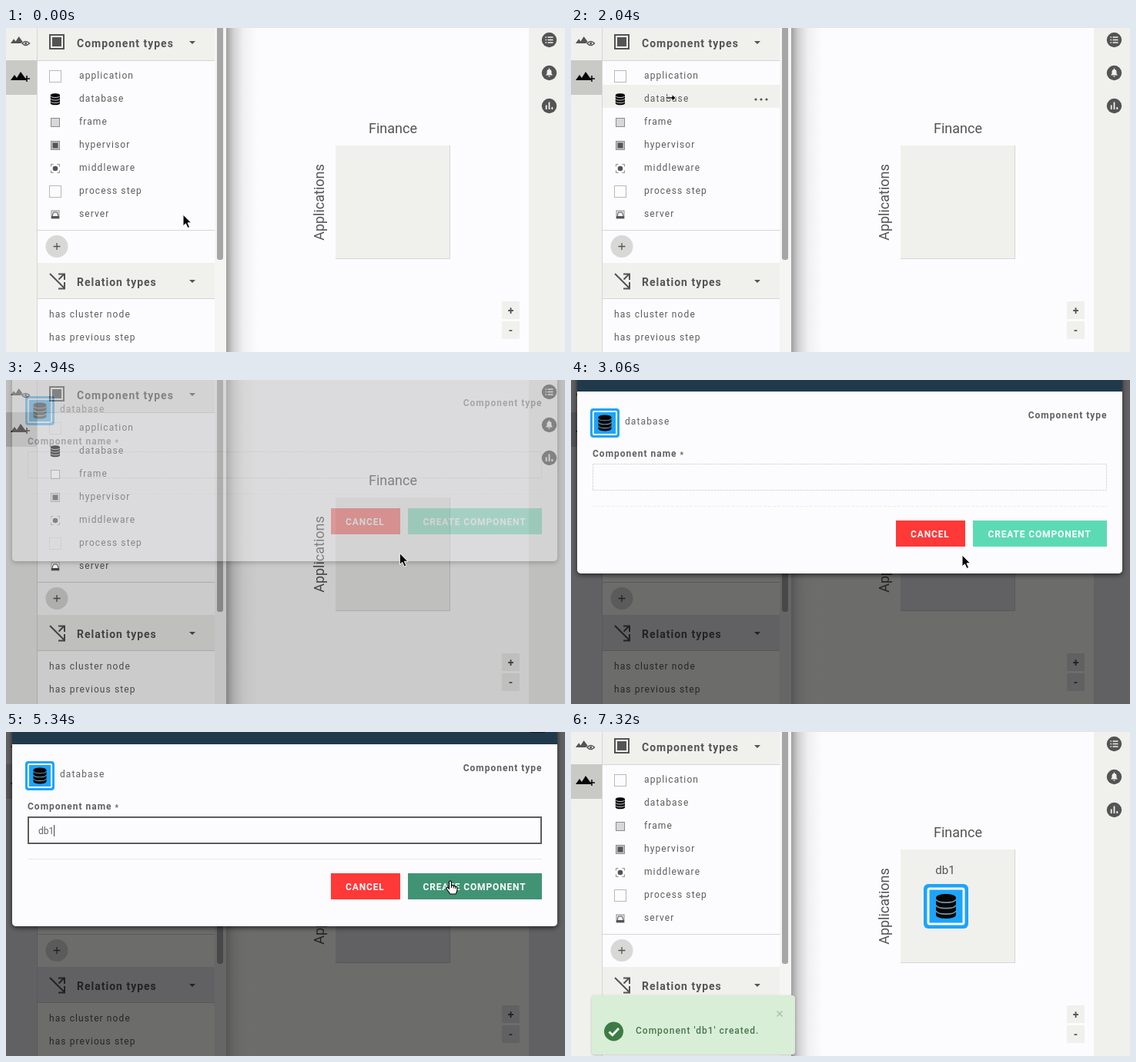
An HTML page for the animation above (7350 ms loop, 726 px wide and 422 px high).

```html
<!DOCTYPE html>
<html lang="en">
<head>
<meta charset="utf-8">
<title>Create a component</title>
<style>
  html, body { margin: 0; width: 100%; height: 100%; overflow: hidden; background: #fcfcfe; }
  svg { display: block; width: 726px; height: 422px; font: 400 12px Roboto, sans-serif; }
  text { fill: var(--text); letter-spacing: 1.1px; white-space: pre; }
  .head { font-size: 14px; letter-spacing: 1px; fill: var(--ink); }
  .label { font-size: 18px; letter-spacing: 0; text-anchor: middle; fill: var(--ink); }
  .medium { font-weight: 500; letter-spacing: 1px; }
  .bold { font-weight: 700; letter-spacing: 1px; }
  .paper { fill: var(--paper); }
  .pale { fill: var(--pale); }
  .tile { fill: var(--tile); }
  .ink { fill: var(--ink); }
  .dark { fill: var(--dark); }
  .line { fill: none; stroke: var(--ink); stroke-width: 2; }
  .thin { fill: none; stroke: var(--ink); stroke-width: 1; }
  .rule { fill: none; stroke: var(--rule); }
  #modal text { fill: #606062; }
  #modal .button { fill: #fcfcfe; letter-spacing: .85px; font-weight: 700; }
</style>
</head>
<body>
<svg id="stage" viewBox="0 0 726 422"></svg>
<script>
const LOOP = 7350;
const rect = (x, y, w, h, attrs = '') => `<rect x="${x}" y="${y}" width="${w}" height="${h}" ${attrs}/>`;
const circle = (x, y, r, attrs = '') => `<circle cx="${x}" cy="${y}" r="${r}" ${attrs}/>`;
const path = (d, attrs = '') => `<path d="${d}" ${attrs}/>`;
const text = (x, y, s, attrs = '') => `<text x="${x}" y="${y}" ${attrs}>${s}</text>`;
const at = (x, y, body, scale = 1) => `<g transform="translate(${x} ${y}) scale(${scale})">${body}</g>`;

// Stack of three discs in a 26 x 32 box
const cylinder = (gap, attrs) =>
  path('M0 5C0-1.6 26-1.6 26 5V27C26 33.6 0 33.6 0 27Z', attrs) +
  [7, 14.5, 22].map(y => path(`M0 ${y}C2 ${y + 5.5} 24 ${y + 5.5} 26 ${y}`, `fill="none" stroke="${gap}" stroke-width="1.7"`)).join('');

const databaseTile =
  rect(0, 0, 58, 58, 'rx="6" fill="#1ca4fa"') +
  rect(6, 6, 46, 46, 'rx="2" fill="#1ca4fa" stroke="#fcfcfe" stroke-width="3"') +
  at(16, 13, cylinder('#6c98b0', 'fill="#060606"'));

const mountains = path('M0 11L5 4L8 8L13 0L21 11Z');
const emptyBox = rect(.5, .5, 15, 15, 'fill="none" stroke="#b8b8b8"');

const rowIcons = {
  application: emptyBox,
  database: at(1.8, .3, cylinder('var(--paper)', 'class="dark"'), .47),
  frame: rect(2.5, 2.5, 11, 11, 'fill="#d8d8d8" stroke="#8c8c8c"'),
  hypervisor: rect(2.5, 2.5, 11, 11, 'fill="#c4c4c4" stroke="#8c8c8c"') + rect(4.5, 4.5, 7, 7, 'class="ink"'),
  middleware: path('M2.5 5.5V2.5H5.5M10.5 2.5H13.5V5.5M13.5 10.5V13.5H10.5M5.5 13.5H2.5V10.5', 'fill="none" stroke="#8c8c8c"') +
    circle(8, 8, 3.3, 'class="ink"'),
  'process step': emptyBox,
  server: rect(3, 3, 10, 10, 'fill="#f0f0f0" stroke="#8c8c8c"') + rect(3, 10, 10, 3, 'class="ink"') + path('M4 10L5.5 5H10.5L12 10', 'class="thin"')
};
const names = Object.keys(rowIcons);

const navigation =
  rect(0, 0, 40, 422, 'class="pale"') + rect(0, 42, 40, 45, 'class="tile"') +
  at(6, 11, `<g class="ink">${mountains}</g>`, .82) +
  path('M19 20Q25.5 13 32 20Q25.5 27 19 20Z', 'class="pale"') +
  path('M21 20Q25.5 15 30.5 20Q25.5 25 21 20Z', 'class="line" style="stroke-width:1.5"') + circle(25.7, 20, 1.5, 'class="ink"') +
  at(6, 57, `<g class="dark">${mountains}</g>`) +
  path('M23 66H31M27 62V70', 'stroke="var(--dark)" stroke-width="1.5"') +
  path('M40.5 0V422', 'class="rule"');

const sectionHead = (y, label) => text(92, y + 25, label, 'class="head bold"') + path(`M238 ${y + 17}h8l-4 4z`, 'class="ink"');

const sidebar =
  rect(41, 0, 245, 422, 'class="paper"') + rect(271, 0, 15, 422, 'class="pale" opacity=".55"') +
  rect(41, 0, 230, 43, 'class="pale"') + path('M41 42.5H271', 'class="rule"') +
  sectionHead(0, 'Component types') +
  rect(57, 9, 18, 18, 'class="line"') + rect(60, 12, 12, 12, 'class="ink"') +
  `<g id="hover">${rect(41, 0, 230, 30, 'class="pale"')}${[240, 247, 254].map(x => circle(x, 19, 1.6, 'class="ink"')).join('')}</g>` +
  names.map((n, i) => at(56, 55 + i * 30, rowIcons[n]) + text(95, 66 + i * 30, n)).join('') +
  path('M41 263.5H271', 'class="rule"') +
  circle(66, 284.5, 14.5, 'class="tile" opacity=".7"') + path('M61.5 284.5H70.5M66 280V289', 'class="line" style="stroke-width:1.3"') +
  rect(41, 306, 230, 47, 'class="pale"') + path('M41 352.5H271', 'class="rule"') +
  sectionHead(311, 'Relation types') +
  path('M57 320L76 339M68 339.5H76V331M68 320.5H76V328M76 320L68.5 327.5', 'class="line"') +
  text(56, 377, 'has cluster node') + text(56, 407, 'has previous step') +
  rect(274, -4, 8, 306, 'rx="3" fill="var(--thumb)"');

const tool = (y, glyph) => circle(705.5, y, 9.7, 'class="ink"') + at(705.5, y, glyph);
const bell = path('M-4.5 3L-3 1V-2Q-3-4.3-.6-4.6V-6H.6V-4.6Q3-4.3 3-2V1L4.5 3ZM-1.5 4H1.5L0 5.5Z', 'class="pale"');
const zoom = (y, sign) => rect(644, y, 23, 23, 'class="pale"') + text(656, y + 17, sign, 'class="head bold" text-anchor="middle"');

const canvas =
  rect(285, 0, 394, 422, 'class="paper"') + rect(285, 0, 42, 422, 'fill="url(#edge)"') +
  rect(428, 153, 149, 148, 'class="pale"') + path('M428 300.5H576.5V153', 'class="rule"') +
  text(502.5, 137, 'Finance', 'class="label"') +
  text(0, 0, 'Applications', 'class="label" transform="translate(412.5 227) rotate(-90)"') +
  `<g id="component">${at(458, 198, databaseTile)}${text(486, 185, 'db1', 'class="label" style="font-size:15px"')}</g>` +
  zoom(356, '+') + zoom(382, '-') +
  rect(679, 0, 47, 422, 'class="pale"') +
  tool(15.5, path('M-5-3.5H-3.5M-2-3.5H5M-5 0H-3.5M-2 0H5M-5 3.5H-3.5M-2 3.5H5', 'stroke="var(--pale)" stroke-width="1.6"')) +
  tool(58.5, bell) +
  tool(101.5, path('M-3.8 4.5V-1M0 4.5V-5M3.8 4.5V1.5', 'stroke="var(--pale)" stroke-width="1.8"'));

const modal = `<g id="modal">` +
  rect(8, -20, 708, 273, 'rx="5" fill="#fcfcfe" filter="url(#shadow)"') +
  rect(8, -20, 708, 36, 'fill="#203a4c"') + rect(681, -4, 19, 5, 'fill="#0c141c"') +
  at(25, 38, databaseTile, .655) + text(70, 59, 'database') +
  text(696.5, 51, 'Component type', 'class="bold" text-anchor="end"') +
  text(28, 101, 'Component name <tspan font-size="10" dy="1">*</tspan>', 'class="bold"') +
  '<rect id="field" fill="#fcfcfe"/>' + '<path id="divider" d="M28 165.5H696" fill="none"/>' +
  '<text id="typed" x="42" y="133" style="letter-spacing:0"></text>' + '<path id="caret" stroke="#404040"/>' +
  rect(422, 184, 90, 34, 'fill="#ff3838"') + text(441, 206, 'CANCEL', 'class="button"') +
  rect(522, 184, 174, 34, 'id="create"') + text(541.5, 206, 'CREATE COMPONENT', 'class="button"') + '</g>';

const toast = `<g id="toast">` + rect(27, 343, 264, 77, 'rx="4" fill="#d8eed6" filter="url(#soft)"') +
  circle(55.5, 390, 12.5, 'fill="#3c7c44"') + path('M49.5 390.5L53.8 394.7L62 386', 'fill="none" stroke="#f4fcf4" stroke-width="3"') +
  text(84, 393, "Component 'db1' created.", 'class="medium" style="fill:#4c7450"') +
  path('M267.5 363.5L274.5 370.5M274.5 363.5L267.5 370.5', 'stroke="#a8c4a8" stroke-width="1.5"') + '</g>';

const outline = 'fill="#080808" stroke="#fcfcfe" stroke-width="1"';
const pointers = {
  arrow: path('M0 0V15L3.4 11.8L6 17.5L8.6 16.3L6 10.8H10.6Z', outline),
  drag: path('M-6-1.2H2V-4.5L7 0L2 4.5V1.2H-6Z', outline),
  beam: path('M-3-7Q0-7 0-5Q0-7 3-7M0-5V5M-3 7Q0 7 0 5Q0 7 3 7', 'fill="none" stroke="#202020" stroke-width="1.2"'),
  hand: path('M-1.5 1Q0-1 1.5 1V6Q3 5 4.2 6.5Q6 6 6.7 7.5Q9 7 9 9.5V12Q8.5 15 7 17H0Q-3 13-5.5 9.5Q-4.5 7-1.5 10Z', 'fill="#fcfcfe" stroke="#080808" stroke-width="1.2"') +
    path('M1.5 6V9M4.2 7V9.5M6.7 8V10', 'stroke="#080808"')
};

const stage = document.getElementById('stage');
stage.innerHTML = `<defs>
  <linearGradient id="edge"><stop offset="0" stop-color="#3c3c3c" stop-opacity=".52"/><stop offset=".25" stop-color="#505050" stop-opacity=".25"/>
  <stop offset=".55" stop-color="#606060" stop-opacity=".08"/><stop offset="1" stop-color="#808080" stop-opacity="0"/></linearGradient>
  <filter id="shadow" x="-5%" y="-5%" width="110%" height="115%"><feDropShadow dx="0" dy="2" stdDeviation="3" flood-color="#000" flood-opacity=".65"/></filter>
  <filter id="soft"><feDropShadow dx="0" dy="1" stdDeviation="1.5" flood-color="#404040" flood-opacity=".3"/></filter></defs>` +
  rect(0, 0, 726, 422, 'class="paper"') + canvas + sidebar + navigation + toast + modal +
  `<g id="pointer">${Object.entries(pointers).map(([k, v]) => `<g data-kind="${k}">${v}</g>`).join('')}</g>`;

const el = Object.fromEntries([...stage.querySelectorAll('[id]')].map(n => [n.id, n]));
const kinds = [...el.pointer.children];

// Each colour in plain view and behind the dialog
const palette = {
  paper: [[252, 252, 254], [108, 108, 107]],
  pale: [[240, 240, 237], [97, 97, 99]],
  tile: [[201, 201, 198], [84, 84, 86]],
  ink: [[84, 84, 84], [34, 34, 34]],
  text: [[92, 92, 92], [38, 38, 38]],
  dark: [[6, 6, 6], [6, 6, 6]],
  rule: [[214, 214, 212], [88, 88, 90]],
  thumb: [[166, 166, 166], [72, 72, 72]]
};

const track = [
  [0, 230, 243], [300, 230, 243], [1300, 129, 91], [2080, 129, 91], [2780, 512, 225], [2900, 512, 225],
  [3060, 508, 228], [3200, 508, 228], [3560, 300, 128], [4960, 300, 128], [5300, 577, 194],
  [5500, 577, 194], [5700, 576, 196], [6100, 576, 196], [6700, 590, 430], [LOOP, 590, 430]
];

const mix = (a, b, k) => a + (b - a) * k;
const ramp = (t, a, b) => Math.min(1, Math.max(0, (t - a) / (b - a)));
const ease = k => k * k * (3 - 2 * k);
const show = (node, on) => node.setAttribute('visibility', on ? 'inherit' : 'hidden');
const set = (node, attrs) => Object.entries(attrs).forEach(([k, v]) => node.setAttribute(k, v));

function position(t) {
  const i = Math.max(1, track.findIndex(p => p[0] > t));
  const [a, b] = [track[i - 1], track[i]];
  const k = ease(ramp(t, a[0], b[0]));
  return [mix(a[1], b[1], k), mix(a[2], b[2], k)];
}

function pointerKind(t, y) {
  if (t >= 1900 && t < 2800) return 'drag';
  if (t > 3300 && t < 5100 && y > 110 && y < 146) return 'beam';
  return t > 5200 && t < 5480 ? 'hand' : 'arrow';
}

function draw(t) {
  const dim = ramp(t, 2900, 3020) * (1 - ramp(t, 5450, 5580));
  for (const [name, [plain, shaded]] of Object.entries(palette))
    stage.style.setProperty('--' + name, `rgb(${plain.map((v, i) => Math.round(mix(v, shaded[i], dim)))})`);

  const [x, y] = position(t);
  const row = t >= 1300 && t < 2700 ? 1 : Math.floor((y - 44) / 30);
  show(el.hover, t > 330 && t < 2700 && row >= 0 && row < names.length);
  el.hover.setAttribute('transform', `translate(0 ${44 + row * 30})`);

  const enter = 1 - (1 - ramp(t, 2900, 3130)) ** 3;
  const leave = ease(ramp(t, 5430, 5580));
  show(el.modal, t >= 2900 && t < 5580);
  set(el.modal, { transform: `translate(0 ${Math.round(-30 * (1 - enter) - 40 * leave)})`, opacity: dim });

  const focused = t >= 3600;
  set(el.field, focused
    ? { x: 29, y: 111, width: 666, height: 34, stroke: '#5c5c5c', 'stroke-width': 2, 'stroke-dasharray': 'none' }
    : { x: 28.5, y: 110.5, width: 667, height: 34, stroke: '#d8d8d8', 'stroke-width': 1, 'stroke-dasharray': '3 1' });
  set(el.divider, focused ? { stroke: '#e8e8ea', 'stroke-dasharray': 'none' } : { stroke: '#ececea', 'stroke-dasharray': '4 2' });
  const count = [4560, 4720, 4900].filter(key => t >= key).length;
  el.typed.textContent = 'db1'.slice(0, count);
  set(el.caret, { d: `M${42.5 + count * 6.7} 121V136` });
  show(el.caret, focused && (t > 4500 || (t - 3600) % 1000 < 500));
  el.create.setAttribute('fill', count ? '#409474' : '#5cdab4');

  show(el.component, t >= 5560);
  show(el.toast, t >= 5600);
  el.toast.setAttribute('opacity', ramp(t, 5600, 5800));

  const kind = pointerKind(t, y);
  kinds.forEach(node => show(node, node.dataset.kind === kind));
  show(el.pointer, !(t > 4500 && t < 4960));
  el.pointer.setAttribute('transform', `translate(${x.toFixed(1)} ${y.toFixed(1)})`);
}

const start = performance.now();
function tick() {
  draw((performance.now() - start) % LOOP);
  requestAnimationFrame(tick);
}
tick();
</script>
</body>
</html>
```
